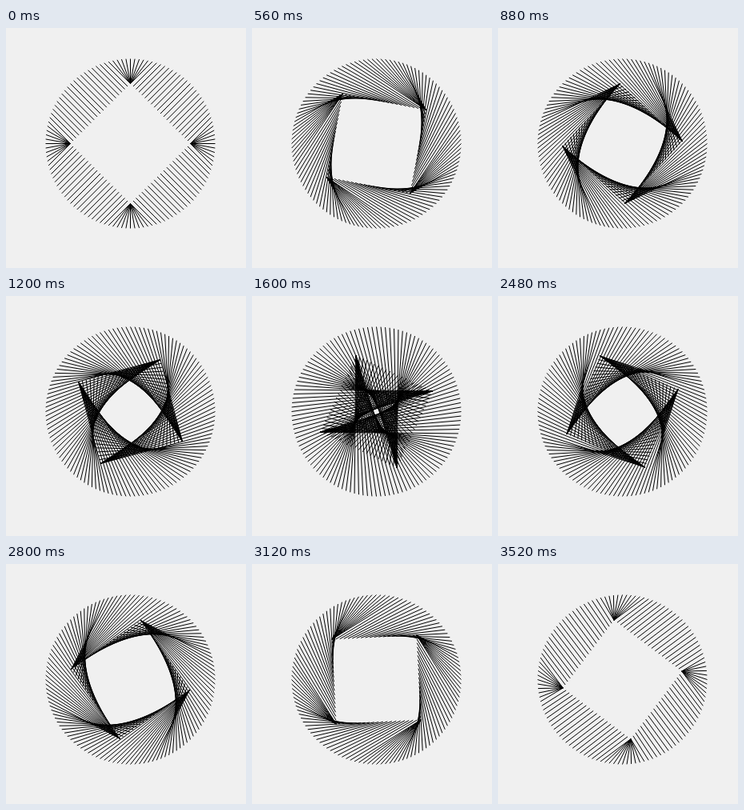
An HTML page with a canvas that plays this animation: 300 by 300 pixels, repeating every 3600 ms.

```html
<!DOCTYPE html>
<html>
<head>
<meta charset="utf-8">
<style>
  html, body { margin: 0; overflow: hidden; background: #f0f0f0; }
  canvas { display: block; }
</style>
</head>
<body>
<canvas width="300" height="300"></canvas>
<script>
const ctx = document.querySelector('canvas').getContext('2d');
const LOOP = 3600, STEP = 80;
const COUNT = 120, RADIUS = 106, CORNER = 75;

// Each spoke joins a rim point to the closest point of a diamond.
const spokes = Array.from({ length: COUNT }, (_, i) => {
  const angle = i / COUNT * 2 * Math.PI;
  const x = RADIUS * Math.cos(angle), y = RADIUS * Math.sin(angle);
  const along = (Math.abs(x) - Math.abs(y) + CORNER) / 2;
  const inner = Math.min(CORNER, Math.max(0, along));
  return { x, y, ix: Math.sign(x) * inner, iy: Math.sign(y) * (CORNER - inner) };
});

function draw(now) {
  const time = Math.floor(now % LOOP / STEP) * STEP;
  const turn = time / LOOP * 2 * Math.PI;
  const c = Math.cos(turn), s = Math.sin(turn);

  ctx.setTransform(1, 0, 0, 1, 0, 0);
  ctx.fillStyle = '#f0f0f0';
  ctx.fillRect(0, 0, 300, 300);
  ctx.translate(155.5, 144.5);
  ctx.beginPath();
  for (const { x, y, ix, iy } of spokes) {
    ctx.moveTo(x, y);
    ctx.lineTo(ix * c - iy * s, ix * s + iy * c);
  }
  ctx.strokeStyle = '#000';
  ctx.lineWidth = 1;
  ctx.stroke();
  requestAnimationFrame(draw);
}
requestAnimationFrame(draw);
</script>
</body>
</html>
```
